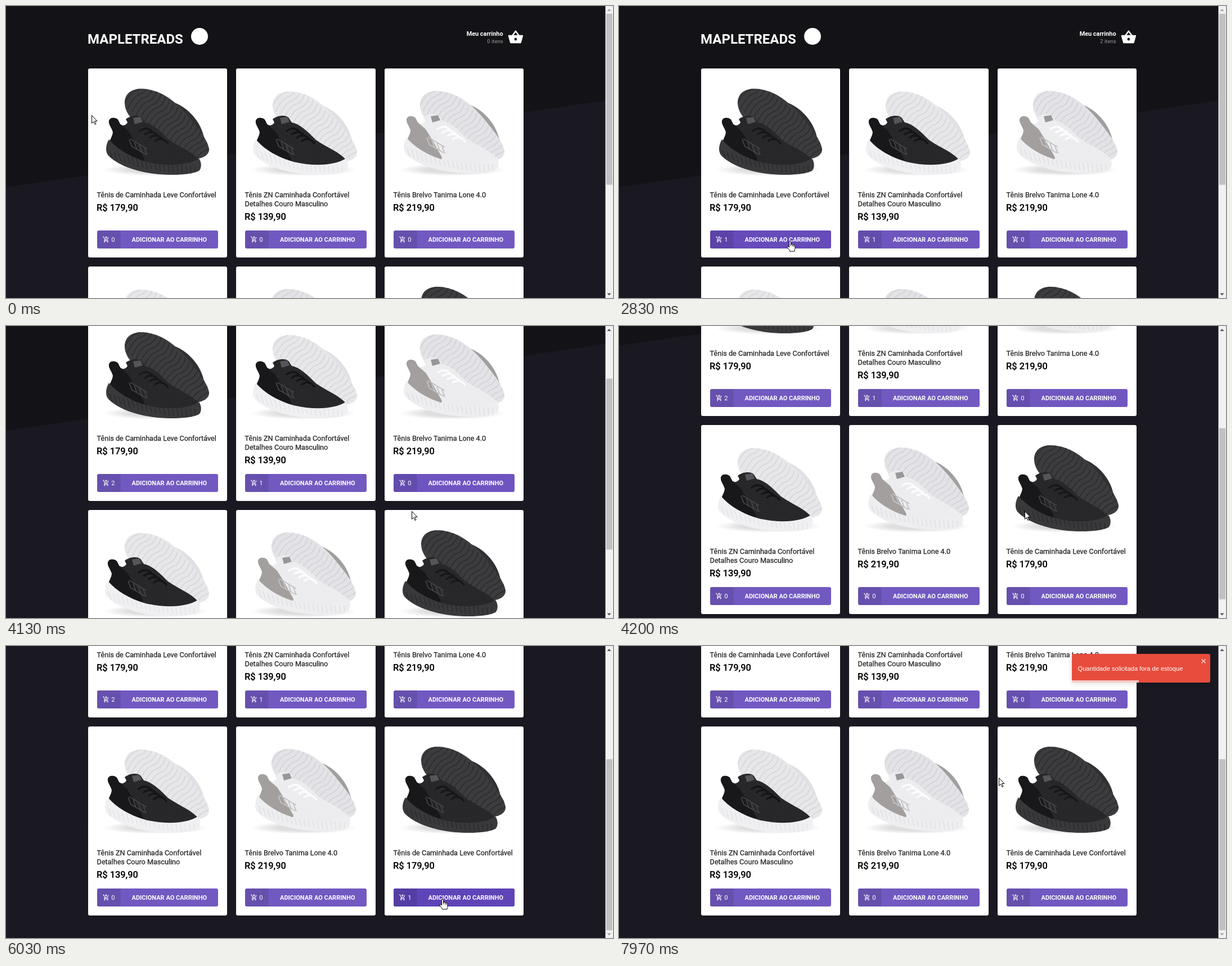
Recreate the animation shown at these times as an HTML page. Size 1079 px wide and 519 px high, loop 8 s.

```html
<!DOCTYPE html>
<html lang="pt-BR">
<head>
<meta charset="utf-8">
<title>Loja de tênis</title>
<style>
  html, body { margin: 0; width: 100%; height: 100%; overflow: hidden; background: #1a1921; }
  svg { display: block; }
  text { font-family: Roboto, sans-serif; white-space: pre; }
  .brand { font-size: 24px; font-weight: 700; fill: #fff; }
  .cart { font-size: 10.9px; font-weight: 700; fill: #fff; text-anchor: end; }
  .items { font-size: 9.5px; fill: #999; text-anchor: end; }
  .title { font-size: 12.65px; fill: #222; stroke: #222; stroke-width: .25; }
  .price { font-size: 16.4px; font-weight: 500; fill: #000; stroke: #000; stroke-width: .15; }
  .label { font-size: 11px; font-weight: 700; fill: #fff; text-anchor: middle; }
  .count { font-size: 11.2px; fill: #fff; }
  .notice { font: 11.1px "Liberation Sans", Arial, sans-serif; fill: #fff; }
</style>
</head>
<body>
<script>
const LOOP = 8000, W = 1079, H = 519;
const PAGE_SCROLL = 320, FADE = 200;
const BTN = { x: 16, y: 288, h: 32, badge: 41.6 };
const TOAST = { x: 805, y: 14, w: 246, h: 51, start: 6130, time: 700, life: 2900 };
const PAUSE = { from: 6830, to: 7170 };

const products = {
  dark: {
    lines: ['Tênis de Caminhada Leve Confortável'], price: 'R$ 179,90',
    back: '#3c3c3f', groove: '#2b2b2e', side: '#303033', upper: '#2a2a2d', mesh: '#1d1d1f',
    heel: '#18181a', sole: '#39393c', rib: '#29292b', lace: '#17171a', strap: '#414145', tag: '#555559',
    backAt: [0, 0], frontAt: [0, 0]
  },
  mixed: {
    lines: ['Tênis ZN Caminhada Confortável', 'Detalhes Couro Masculino'], price: 'R$ 139,90',
    back: '#e7e7ea', groove: '#d5d5da', side: '#e0e0e4', upper: '#2a2a2d', mesh: '#1d1d1f',
    heel: '#18181a', sole: '#f0f0f2', rib: '#e2e2e6', lace: '#141416', strap: '#424246', tag: '#55555a',
    backAt: [0, 5], frontAt: [-2, 0]
  },
  light: {
    lines: ['Tênis Brelvo Tanima Lone 4.0'], price: 'R$ 219,90',
    back: '#e3e3e7', groove: '#d1d1d6', side: '#a09e9f', upper: '#f0f0f2', mesh: '#e0e0e4',
    heel: '#a39f9f', sole: '#eeeef0', rib: '#dedee2', lace: '#fcfcfd', strap: '#c4c2c4', tag: '#97979a',
    backAt: [-2, 4], frontAt: [2, -3]
  }
};
const grid = ['dark', 'mixed', 'light', 'mixed', 'light', 'dark'];
const cards = grid.map((kind, i) => {
  const left = 146.1 + 263.2 * (i % 3), x = Math.round(left);
  return { kind, x, y: i < 3 ? 111 : 463, w: Math.round(left + 247.2) - x };
});

// Pointer moves: leave time, arrival time, goal x, goal y
const start = [152, 194];
const moves = [
  [30, 770, 285, 416], [1780, 1870, 492, 430], [2070, 2450, 516, 420], [2500, 2870, 297, 418],
  [3230, 3270, 299, 419], [3430, 3770, 770, 424], [3870, 4130, 721, 329], [4270, 4600, 766, 466],
  [4650, 5070, 771, 460], [5470, 5670, 774, 445], [6000, 6030, 776, 450],
  [PAUSE.from - 600, PAUSE.from, 930, 40], [PAUSE.to, 7970, 675, 234]
];
// Cart changes: time, card
const additions = [[1870, 0], [2470, 1], [3070, 0], [5200, 5]];

const clamp = v => Math.min(1, Math.max(0, v));
const smooth = v => v * v * (3 - 2 * v);
const easeOut = v => 1 - (1 - v) ** 3;
const progress = (t, from, to) => clamp((t - from) / (to - from));
const mix = (a, b, p) => a + (b - a) * p;
const repeat = (n, fn) => Array.from({ length: n }, (_, i) => fn(i)).join('');

function clock(time) {
  const t = Math.floor(time / 10) * 10;
  return t < 770 || t >= 2070 ? t : t < 1870 ? 770 : 1870;
}

const scrollAt = t => PAGE_SCROLL * smooth(progress(t, 4040, 4240));

function pointerAt(t) {
  let [x, y] = start;
  for (const [from, to, goalX, goalY] of moves) {
    const p = smooth(progress(t, from, to));
    x = mix(x, goalX, p);
    y = mix(y, goalY, p);
  }
  return [x, y];
}

// Flies in from the right, then swings out
function toastShift(p) {
  if (p < .6) return mix(2400, -20, easeOut(p / .6));
  const q = (p - .6) / .4;
  return -20 * Math.cos(q * Math.PI * 8 / 3) * (1 - q) ** 1.5;
}

// The bar waits while the pointer rests on the toast
function toastLeft(t) {
  const run = Math.min(t, PAUSE.from) - TOAST.start + Math.max(0, t - PAUSE.to);
  return TOAST.w * (1 - clamp(run / TOAST.life));
}

const BACK = 'M211 172C211 153 227 146 244 147C279 150 303 171 325 197C342 218 361 241 361 256C360 270 335 276 318 270L250 225C225 205 211 190 211 172Z';
const UPPER = 'M183 204C185 198 193 197 199 202L203 210C208 214 213 212 216 207L213 201C221 194 236 193 241 198L247 207C262 210 274 222 290 238C308 251 330 258 344 274C330 288 280 290 250 281C220 272 195 262 183 250C183 238 190 232 190 224C188 216 182 211 183 204Z';
const HEEL = 'M183 204C185 198 193 197 199 202L203 210L217 222L227 238L246 272L244 280C220 272 195 262 183 250C183 238 190 232 190 224C188 216 182 211 183 204Z';
const SOLE = 'M183 237C177 247 176 259 182 266C200 284 232 294 262 298C295 302 330 300 343 293C348 288 348 278 343 271C325 283 288 286 250 277C222 269 198 255 183 237Z';

function shoe(id, c) {
  const grooves = repeat(20, i => {
    const x = 218 + i * 7.2, y = 146 + i * 6.3;
    return `M${x + 22} ${y - 22}q-4 16-16 20t-22 26`;
  });
  const ribs = repeat(20, i => {
    const p = i / 19;
    return `M${184 + 152 * p} ${256 + 52 * p - 24 * p * p}l${5 - 4 * p} 15`;
  });
  const laces = repeat(4, i => `M${238 + i * 9} ${222 + i * 6}q12-9 22 ${1 + i}`);
  const straps = repeat(4, i => `M${219 + i * 9} ${237 + i * 5}l5 13`);
  return `<g id="${id}" transform="translate(-146 -111)">
    <ellipse cx="266" cy="291" rx="94" ry="11" fill="url(#shade)"/>
    <g transform="translate(${c.backAt})">
      <path d="M300 172C326 182 347 208 352 234L325 215Z" fill="${c.side}"/>
      <path d="${BACK}" fill="${c.back}"/>
      <path d="${grooves}" clip-path="url(#backClip)" fill="none" stroke="${c.groove}" stroke-width="1.6"/>
    </g>
    <g transform="translate(${c.frontAt})">
      <pattern id="${id}Mesh" width="3" height="3" patternUnits="userSpaceOnUse">
        <rect width="3" height="3" fill="${c.upper}"/><circle cx="1.5" cy="1.5" r=".8" fill="${c.mesh}"/>
      </pattern>
      <path d="${UPPER}" fill="url(#${id}Mesh)"/>
      <path d="${HEEL}" fill="${c.heel}"/>
      <path d="${SOLE}" fill="${c.sole}"/>
      <path d="${ribs}" clip-path="url(#soleClip)" stroke="${c.rib}" stroke-width="1.4"/>
      <path d="M226 199l13-2 4 9-14 4z" fill="${c.tag}"/>
      <path d="M221 236l30 18M223 249l26 15${straps}" fill="none" stroke="${c.strap}" stroke-width="2"/>
      <path d="${laces}" fill="none" stroke="${c.lace}" stroke-width="3.4" stroke-linecap="round"/>
    </g>
  </g>`;
}

function card({ kind, x, y, w }) {
  const { lines, price } = products[kind];
  const titles = lines.map((s, i) => `<text class="title" x="15.6" y="${228.7 + 16 * i}">${s}</text>`).join('');
  const wide = w - 2 * BTN.x;
  const face = `x="${BTN.x}" y="${BTN.y}" width="${wide}" height="${BTN.h}" rx="3.2"`;
  return `<g transform="translate(${x} ${y})">
    <rect width="${w}" height="336" rx="3.2" fill="#fff"/>
    <use href="#${kind}"/>
    ${titles}
    <text class="price" x="15" y="${237 + 16 * lines.length}">${price}</text>
    <rect ${face} fill="#7159c1"/>
    <rect ${face} fill="#5f44b7" class="hover" opacity="0"/>
    <path d="M57.600 288v32H19.200a3.200 3.200 0 0 1-3.200-3.200v-25.600a3.200 3.200 0 0 1 3.200-3.200z" opacity=".1"/>
    <use href="#addIcon" transform="translate(25.500 297.600) scale(.533)"/>
    <text class="count" x="41.3" y="308">0</text>
    <text class="label" x="${BTN.x + (wide + BTN.badge) / 2}" y="308">ADICIONAR AO CARRINHO</text>
  </g>`;
}

document.body.innerHTML = `<svg width="${W}" height="${H}" viewBox="0 0 ${W} ${H}">
  <defs>
    <radialGradient id="shade"><stop offset=".5" stop-opacity=".13"/><stop offset="1" stop-opacity="0"/></radialGradient>
    <clipPath id="backClip"><path d="${BACK}"/></clipPath>
    <clipPath id="soleClip"><path d="${SOLE}"/></clipPath>
    <g id="addIcon" fill="#fff">
      <path d="M1 3h2.600l4.300 9h7.700L20 4.500M8 12l-2 4h13M12 1v8M8 5h8" fill="none" stroke="#fff" stroke-width="2"/>
      <circle cx="7" cy="20" r="2"/><circle cx="17" cy="20" r="2"/>
    </g>
    ${Object.entries(products).map(([id, c]) => shoe(id, c)).join('')}
  </defs>
  <rect width="${W}" height="${H}" fill="#1a1921"/>
  <g id="page">
    <path d="M0 0H1066V168L0 322Z" fill="#131317"/>
    <text class="brand" x="145" y="67">MAPLETREADS</text>
    <circle cx="344" cy="54" r="15" fill="#fff"/>
    <text class="cart" x="883.6" y="52.5">Meu carrinho</text>
    <text class="items" x="883.6" y="65.5" id="items"></text>
    <g transform="translate(891.500 41) scale(1.2)" fill="#fff" stroke="#fff" stroke-width="2" stroke-linejoin="round">
      <path d="M2 10h20l-2.800 10H4.800z"/>
      <path d="M7 10l5-7 5 7" fill="none"/>
      <circle cx="12" cy="15" r="2" fill="#131317" stroke="none"/>
    </g>
    ${cards.map(card).join('')}
  </g>
  <g id="toast" style="filter: drop-shadow(0 1px 4px rgba(0,0,0,.15))">
    <rect x="${TOAST.x}" y="${TOAST.y}" width="${TOAST.w}" height="${TOAST.h}" rx="3.2" fill="#e74c3c"/>
    <text class="notice" x="815.5" y="43.5">Quantidade solicitada fora de estoque</text>
    <path d="M1035.500 23.500l7 7m0-7l-7 7" stroke="#fff" stroke-width="1.5" opacity=".75"/>
    <rect id="bar" x="${TOAST.x}" y="61" height="4" fill="#fff" opacity=".7"/>
  </g>
  <rect x="1065.5" width="14" height="${H}" fill="#f1f1f1"/>
  <rect id="thumb" x="1067" width="11" height="304" fill="#c1c1c1"/>
  <path id="up" d="M1068.500 9l3.500-4 3.500 4z"/>
  <path id="down" d="M1068.500 510.500l3.500 4 3.500-4z"/>
  <g id="pointer" stroke="#000" stroke-linejoin="round" fill="#fff">
    <path id="arrow" d="M.5.5V14.500L3.500 11.500L6 16.500L8 15.500L5.500 10.500H10Z"/>
    <g id="hand">
      <path d="M-1.500 1.500a1.500 1.500 0 0 1 3 0V6C2 5 4 5 4.500 6.500C5 5.500 6.500 6 7 7C7.500 6.500 9 7 9 8.500V12C9 14 8 15 8 18H-.500C-.500 15.500-3 14-5 11C-5.500 9.500-4 8.500-3 9.500L-1.500 11Z"/>
      <path d="M1.500 6v3M4.500 6.500v3M7 7v3" fill="none" stroke-width=".9"/>
    </g>
  </g>
</svg>`;

const names = ['page', 'items', 'toast', 'bar', 'thumb', 'up', 'down', 'pointer', 'arrow', 'hand'];
const ui = Object.fromEntries(names.map(id => [id, document.getElementById(id)]));
const hovers = document.querySelectorAll('.hover');
const counts = document.querySelectorAll('.count');
const set = (node, name, value) => node.setAttribute(name, value);
const show = (node, on) => { node.style.display = on ? '' : 'none'; };
const inside = (x, y, b) => x >= b.x && x <= b.x + b.w && y >= b.y && y <= b.y + b.h;

function hoveredCard(t) {
  const [x, y] = pointerAt(t), top = y + scrollAt(t);
  return cards.findIndex(c => inside(x - c.x, top - c.y, { ...BTN, w: c.w - 2 * BTN.x }));
}

// Share of the last moments spent on each button
function hoverLevels(t) {
  const levels = cards.map(() => 0), samples = 20;
  for (let k = 0; k < samples; k++) {
    const i = hoveredCard(t - k * FADE / samples);
    if (i >= 0) levels[i] += 1 / samples;
  }
  return levels;
}

function draw(time) {
  const t = clock(time), scroll = scrollAt(t), [x, y] = pointerAt(t);
  set(ui.page, 'transform', `translate(0 ${-Math.round(scroll)})`);
  set(ui.thumb, 'y', 13.7 + scroll * .586);
  set(ui.up, 'fill', scroll > 0 ? '#505050' : '#a3a3a3');
  set(ui.down, 'fill', scroll < PAGE_SCROLL ? '#505050' : '#a3a3a3');

  const amounts = cards.map((_, i) => additions.filter(([at, n]) => n === i && t >= at).length);
  amounts.forEach((n, i) => { counts[i].textContent = n; });
  const kinds = amounts.filter(n => n > 0).length;
  ui.items.textContent = `${kinds} ${kinds === 1 ? 'item' : 'itens'}`;
  hoverLevels(t).forEach((v, i) => set(hovers[i], 'opacity', clamp(v)));

  const age = progress(t, TOAST.start, TOAST.start + TOAST.time), shift = toastShift(age);
  show(ui.toast, age > 0);
  set(ui.toast, 'transform', `translate(${shift} 0)`);
  set(ui.toast, 'opacity', easeOut(clamp(age / .6)));
  set(ui.bar, 'width', toastLeft(t));

  const pointing = hoveredCard(t) >= 0 || (age > 0 && inside(x - shift, y, TOAST));
  show(ui.hand, pointing);
  show(ui.arrow, !pointing);
  set(ui.pointer, 'transform', `translate(${Math.round(x)} ${Math.round(y)})`);
}

const began = performance.now();
function tick() {
  draw((performance.now() - began) % LOOP);
  requestAnimationFrame(tick);
}
tick();
</script>
</body>
</html>
```
